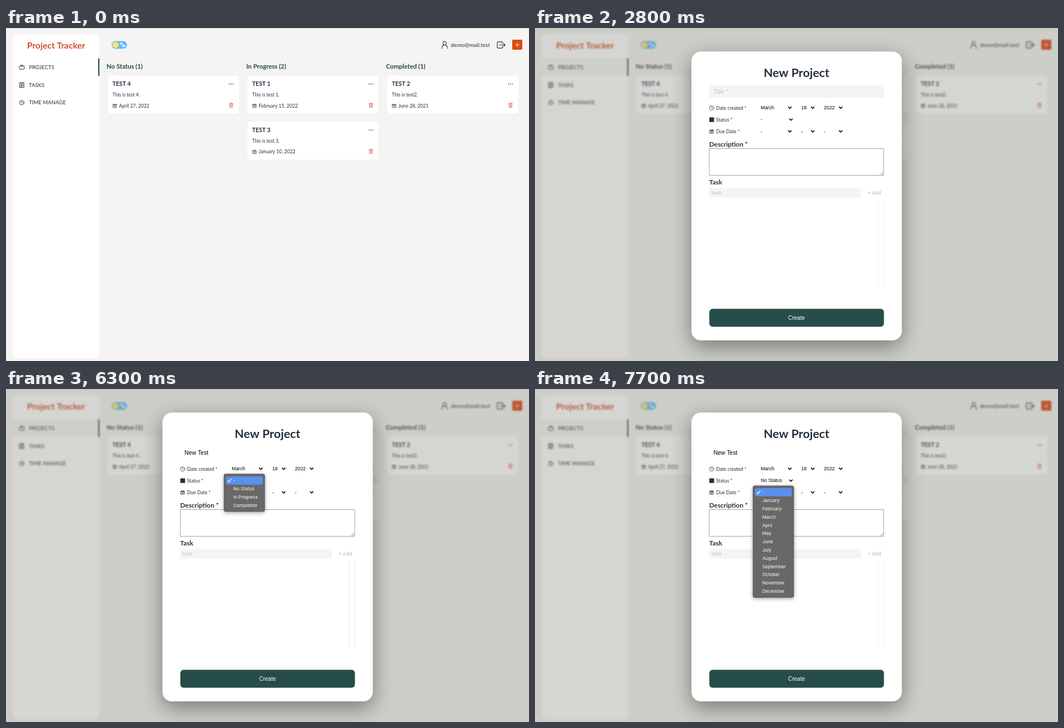
These frames come from a looping animation (936x598 px, 8000 ms). An HTML page with a canvas:

```html
<!DOCTYPE html>
<html lang="en">
<head>
<meta charset="utf-8">
<title>Project Tracker</title>
<style>
  html, body { margin: 0; width: 100%; height: 100%; overflow: hidden; background: #f5f4f2; }
  canvas { display: block; width: 936px; height: 598px; }
</style>
</head>
<body>
<canvas id="stage" width="936" height="598"></canvas>
<script>
const W = 936, H = 598, LOOP = 8000, STEP = 70;
const LATO = 'Lato, sans-serif';
const ARIAL = '"Liberation Sans", Arial, sans-serif';
const MENU = 'Inter, sans-serif';
const INK = '#25303d', GREEN = '#264d4a', ORANGE = '#d2502a', SAND = '#f5f4f2';
const MONTHS = ['January', 'February', 'March', 'April', 'May', 'June', 'July',
  'August', 'September', 'October', 'November', 'December'];
const STATUSES = ['No Status', 'In Progress', 'Completed'];

const stage = document.getElementById('stage').getContext('2d');
let c = stage;

const clamp = v => Math.max(0, Math.min(1, v));
const ramp = (t, from, to) => clamp((t - from) / (to - from));

// y is the middle of the capital letters
function text(s, x, y, size, color = INK, { font = LATO, weight = 400, align = 'left' } = {}) {
  c.font = `${weight} ${size}px ${font}`;
  c.textAlign = align;
  c.fillStyle = color;
  c.fillText(s, x, y + size * 0.36);
}

function box(x, y, w, h, r, color) {
  c.beginPath();
  c.roundRect(x, y, w, h, r);
  c.fillStyle = color;
  c.fill();
}

function disc(x, y, r, color) {
  c.beginPath();
  c.arc(x, y, r, 0, Math.PI * 2);
  c.fillStyle = color;
  c.fill();
}

function stroke(d, x, y, color = INK, width = 1) {
  c.save();
  c.translate(x, y);
  c.strokeStyle = color;
  c.lineWidth = width;
  c.lineCap = c.lineJoin = 'round';
  c.stroke(new Path2D(d));
  c.restore();
}

const ICON = {
  clock: 'M4 0A4 4 0 1 1 -4 0A4 4 0 1 1 4 0M0 -2.3V0.3H2',
  calendar: 'M-3 -2.5H3V3.2H-3ZM-1.6 -3.3V-2.5M1.6 -3.3V-2.5M-3 -1.2H3M-1 1H1M0 0V2',
  bag: 'M-3.4 -2.2H3.4Q4.2 -2.2 4.2 -1.4V2.8Q4.2 3.6 3.4 3.6H-3.4Q-4.2 3.6 -4.2 2.8V-1.4Q-4.2 -2.2 -3.4 -2.2ZM-1.8 -2.2V-3.8H1.8V-2.2',
  notes: 'M-3.7 -3.8H3.7V4.6H-3.7ZM-1.8 -4.8V-3M1.8 -4.8V-3M-2 -1H2M-2 1H2M-2 2.8H0.5',
  user: 'M3 -3A3 3.3 0 1 1 -3 -3A3 3.3 0 1 1 3 -3M-5.2 6.2Q-5 1.2 -1.6 0.8M5.2 6.2Q5 1.2 1.6 0.8',
  exit: 'M2.5 -2.6V-4.2Q2.5 -5.6 1 -5.6H-5.6Q-7 -5.6 -7 -4.2V4.2Q-7 5.6 -5.6 5.6H1Q2.5 5.6 2.5 4.2V2.6M-3 0H7M4.3 -2.7L7 0L4.3 2.7',
  trash: 'M-3.4 -2.7H3.4M-1.3 -2.7V-4H1.3V-2.7M-2.7 -2.7L-2.3 4H2.3L2.7 -2.7M-0.9 -1V2.4M0.9 -1V2.4',
  chevron: 'M-2.5 -1.3L0 1.3L2.5 -1.3',
  check: 'M-3 0.3L-1 2.6L3 -2.8',
};

function drawCard(x, y, title, note, date) {
  box(x, y, 234.5, 68, 5, '#fff');
  text(title, x + 8.5, y + 15, 10.4, INK, { weight: 700 });
  text(note, x + 8.5, y + 34.8, 8.5);
  stroke(ICON.calendar, x + 12.7, y + 54.2, INK, 0.75);
  text(date, x + 20.3, y + 54.2, 8.6);
  for (const dx of [-3.4, 0, 3.4]) disc(x + 221 + dx, y + 15, 0.95, '#555d66');
  stroke(ICON.trash, x + 221, y + 53.2, '#e5705a', 0.95);
}

function drawPlus(opacity) {
  box(906, 21, 18, 18, 2, SAND);
  c.globalAlpha = opacity;
  box(906, 21, 18, 18, 2, '#dc4a15');
  stroke('M-3.6 0H3.6M0 -3.6V3.6', 915, 30.3, '#fbe4da', 1.1);
  c.globalAlpha = 1;
}

function drawBoard() {
  c.fillStyle = SAND;
  c.fillRect(0, 0, W, H);
  c.fillStyle = 'rgba(0,0,0,.1)';
  c.fillRect(0, 0, W, 1);

  box(12, 11, 155, 582, 9, '#fff');
  text('Project Tracker', 89.7, 31, 15.5, ORANGE, { weight: 700, align: 'center' });
  const links = [['PROJECTS', 'bag'], ['TASKS', 'notes'], ['TIME MANAGE', 'clock']];
  links.forEach(([name, icon], i) => {
    const y = 70.6 + i * 31.7;
    stroke(ICON[icon], 28.3, y, INK, 1);
    text(name, 41, y, 9.5);
  });
  box(165, 54.5, 2.2, 31.5, 0, GREEN);

  box(189, 23.6, 27.6, 13.6, 6.8, '#5fbffb');
  disc(196, 30.4, 5.7, '#fbe273');
  for (const [x, y, r] of [[205, 28.4, 1.2], [207, 27.8, 1.6], [208.6, 32.6, 1.4], [210.6, 31.8, 2], [212.6, 32.7, 1.3]])
    disc(x, y, r, '#f4fbff');

  stroke(ICON.user, 785, 30.5, INK, 1.1);
  text('demo@mail.test', 796, 30.5, 10);
  stroke(ICON.exit, 886.3, 30.5, INK, 1.2);

  ['No Status (1)', 'In Progress (2)', 'Completed (1)'].forEach((s, i) =>
    text(s, 180 + i * 250, 69.2, 11.3, '#25454a', { weight: 700 }));
  drawCard(182, 85.5, 'TEST 4', 'This is test 4.', 'April 27, 2022');
  drawCard(432, 85.5, 'TEST 1', 'This is test 1.', 'February 15, 2022');
  drawCard(432, 168.2, 'TEST 3', 'This is test 3.', 'January 10, 2022');
  drawCard(682, 85.5, 'TEST 2', 'This is test2.', 'June 28, 2021');
  drawPlus(1);
}

function offscreen(draw) {
  const layer = document.createElement('canvas');
  layer.width = W;
  layer.height = H;
  c = layer.getContext('2d');
  draw();
  c = stage;
  return layer;
}

function drawSelects(y, values, firstChevron) {
  [404, 476.5, 517].forEach((x, i) => {
    if (values[i] === undefined) return;
    text(values[i], x, y, 8.67, '#000', { font: ARIAL });
    stroke(ICON.chevron, [firstChevron, 497, 547][i], y + 0.2, '#000', 1.6);
  });
}

function drawModal() {
  c.fillStyle = SAND;
  c.fillRect(0, 0, W, H);
  c.filter = 'blur(1.4px)';
  c.drawImage(board, 0, 0);
  c.filter = 'none';
  c.fillStyle = 'rgba(70,90,75,.06)';
  c.fillRect(12, 54, 155, 31);
  c.fillStyle = 'rgba(117,117,104,.3)';
  c.fillRect(0, 0, W, H);

  c.save();
  c.shadowColor = 'rgba(0,0,0,.42)';
  c.shadowBlur = 37;
  c.shadowOffsetY = 11;
  box(280, 42.3, 376.5, 518.7, 17, '#fff');
  c.restore();

  text('New Project', 468, 80.6, 21.3, INK, { weight: 700, align: 'center' });
  stroke(ICON.clock, 316.2, 143.6, INK, 0.8);
  text('Date created *', 324, 143.8, 8.6);
  box(312, 160.5, 8.5, 8.2, 0.5, INK);
  text('Status *', 324, 165, 8.6);
  stroke(ICON.calendar, 316.2, 185.8, INK, 0.9);
  text('Due Date *', 324, 186, 8.6);
  drawSelects(143, ['March', '18', '2022'], 456);
  drawSelects(185.5, ['-', '-', '-'], 456);

  text('Description *', 311.7, 209, 11.8, INK, { weight: 700 });
  c.strokeStyle = '#a3a3a3';
  c.lineWidth = 1;
  c.strokeRect(312, 216.5, 312, 48);
  stroke('M-5 0L0 -5M-2.2 0L0 -2.2', 623, 263.5, '#777', 0.8);

  text('Task', 311.7, 276.6, 11.8, INK, { weight: 700 });
  box(312, 287.3, 271, 17.2, 0, SAND);
  text('task', 316.5, 296, 8.67, '#dccabd', { font: ARIAL, weight: 700 });
  text('+ Add', 595.3, 296, 8.67, '#c9c9c9', { font: ARIAL, weight: 700 });
  c.fillStyle = '#ececec';
  c.fillRect(614, 308, 1, 156);
  c.fillRect(624, 308, 1, 156);

  box(312, 504.3, 312.5, 32.3, 6, GREEN);
  text('Create', 468, 520.5, 10, '#fff', { font: ARIAL, align: 'center' });
}

const KEYS = [[3290, 'N'], [3710, 'e'], [3780, 'w'], [3920, ' '], [4270, 'T'], [4480, 'e'], [4620, 's'], [4900, 't']];

function drawTitleField(t) {
  const tint = (0.5 * ramp(t, 1400, 1750) + 0.5 * ramp(t, 2310, 2660)) * (1 - ramp(t, 5880, 6300));
  c.globalAlpha = tint;
  box(312, 102.3, 312.5, 23, 0, SAND);
  c.globalAlpha = 1;

  const typed = KEYS.filter(([at]) => t >= at).map(([, key]) => key).join('');
  if (typed) text(typed, 319.5, 114.2, 10.4, '#000', { font: ARIAL });
  else text('Title *', 319.5, 114.2, 10.4, '#cfc2b8', { font: ARIAL });

  const caretOn = t >= 2240 && t < 5390 && !(t >= 2800 && t < 3290);
  if (caretOn) {
    c.font = `10.4px ${ARIAL}`;
    c.fillStyle = '#000';
    c.fillRect(Math.round(319.4 + c.measureText(typed).width), 108, 0.8, 12);
  }
}

function drawMenu(firstY, items, active, alpha = 1) {
  const rows = ['-', ...items], pitch = 14.8;
  const layer = offscreen(() => {
    c.save();
    c.shadowColor = 'rgba(0,0,0,.35)';
    c.shadowBlur = 7;
    c.shadowOffsetY = 2;
    box(389.8, firstY - 12, 73.6, rows.length * pitch + 9, 4, '#545454');
    c.restore();
    box(390.5, firstY - 11.3, 72.2, rows.length * pitch + 7.6, 3.5, '#686868');
    if (active >= 0) box(393.8, firstY - 7.4 + active * pitch, 65.8, pitch, 2.6, '#5a90ee');
    rows.forEach((s, i) => text(s, 406.7, firstY + i * pitch, 8.2, '#fff', { font: MENU }));
    stroke(ICON.check, 400, firstY + 0.2, '#fff', 1.3);
  });
  c.globalAlpha = alpha;
  c.drawImage(layer, 0, 0);
  c.globalAlpha = 1;
}

const board = offscreen(drawBoard);
const modal = offscreen(drawModal);

function render(time) {
  const t = Math.floor((time % LOOP) / STEP) * STEP;
  if (t < 1120) {
    c.drawImage(board, 0, 0);
    drawPlus(1 - 0.14 * ramp(t, 560, 840));
    return;
  }
  c.drawImage(modal, 0, 0);
  drawTitleField(t);
  drawSelects(164.3, [t < 7140 ? '-' : 'No Status'], 458);

  if (t >= 5950 && t < 7280) {
    const active = t < 6510 ? 0 : t === 6930 ? -1 : 1;
    drawMenu(164.3, STATUSES, active, t < 7070 ? 1 : 0.82 - 0.27 * (t - 7070) / STEP);
  }
  if (t >= 7700) drawMenu(185.4, MONTHS, 0);
}

function tick() {
  render(performance.now());
  requestAnimationFrame(tick);
}
tick();
</script>
</body>
</html>
```
